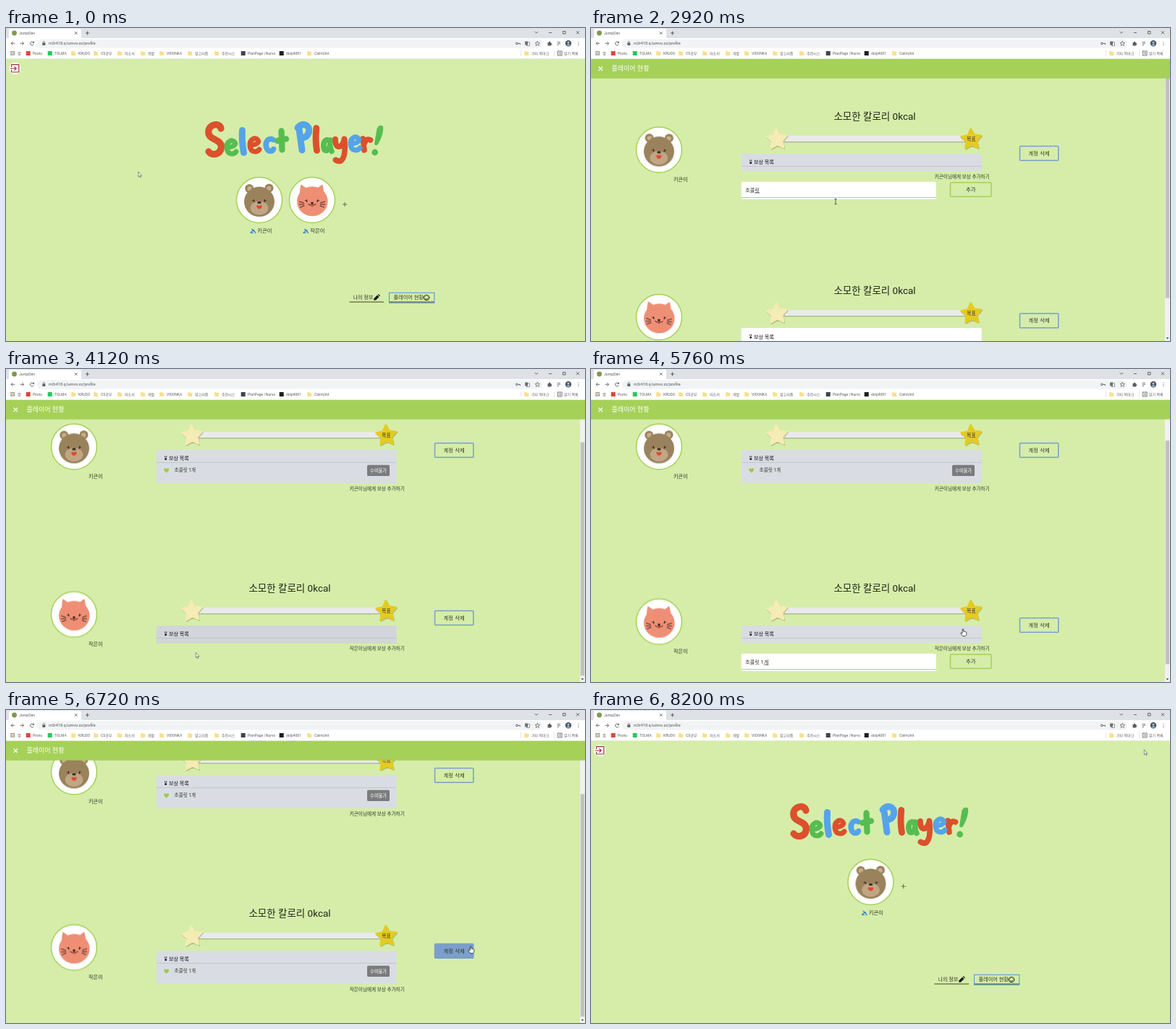
Animation, 800 px wide and 433 px high, one loop 8240 ms. Source, as an HTML page:

```html
<!DOCTYPE html>
<html lang="ko">
<head>
<meta charset="utf-8">
<title>Player select</title>
<style>
html, body { margin: 0; width: 100%; height: 100%; overflow: hidden; background: #d5eda9; }
svg { display: block; width: 100%; height: 100%; }
text { font-family: Roboto, 'Noto Sans CJK KR', 'Noto Sans CJK JP', sans-serif; white-space: pre; }
.head { animation: sway 1648ms ease-in-out infinite; }
@keyframes sway {
  0%, 50%, 100% { transform: rotate(0deg); }
  25% { transform: rotate(-1.5deg); }
  75% { transform: rotate(1.5deg); }
}
</style>
</head>
<body>
<svg id="stage" viewBox="0 0 800 433"></svg>
<script>
const LOOP = 8240, GREEN = '#a5d158', PAGE = '#d5eda9', INK = '#30362a', BLUE = '#7b9fc9';
const RED = '#dc502c', LEAF = '#57bd50', SKY = '#55a4ea';

// ---- markup helpers ----
const rect = (x, y, w, h, fill, more = '') => `<rect x="${x}" y="${y}" width="${w}" height="${h}" fill="${fill}" ${more}/>`;
const dot = (x, y, r, fill, more = '') => `<circle cx="${x}" cy="${y}" r="${r}" fill="${fill}" ${more}/>`;
const oval = (x, y, rx, ry, fill) => `<ellipse cx="${x}" cy="${y}" rx="${rx}" ry="${ry}" fill="${fill}"/>`;
const line = (d, color, w = 1, more = '') => `<path d="${d}" fill="none" stroke="${color}" stroke-width="${w}" ${more}/>`;
const shape = (d, fill, more = '') => `<path d="${d}" fill="${fill}" ${more}/>`;
const label = (x, y, size, str, color = INK, more = '') =>
  `<text x="${x}" y="${y + size * .36}" font-size="${size}" fill="${color}" ${more}>${str}</text>`;
const at = (x, y, inner, more = '') => `<g transform="translate(${x} ${y})" ${more}>${inner}</g>`;
const ROUND = 'stroke-linecap="round" stroke-linejoin="round"';
const MID = 'text-anchor="middle"';

function star(x, y, fill) {
  const pts = [...Array(10)].map((_, i) => {
    const a = i * Math.PI / 5 - Math.PI / 2 - .06, r = i % 2 ? 7.4 : 14.6;
    return (x + r * Math.cos(a)).toFixed(1) + ',' + (y + 1 + r * Math.sin(a)).toFixed(1);
  }).join(' ');
  const poly = (c, more) => `<polygon points="${pts}" fill="${c}" stroke="${c}" stroke-width="2.4" stroke-linejoin="round" ${more}/>`;
  return poly('#8f9468', 'transform="translate(.7 1.2)" opacity=".55"') + poly(fill, '');
}

const heart = (x, y, fill) => at(x, y, shape('M0 3.400C-6 -1 -3 -5 0 -2C3 -5 6 -1 0 3.400Z', fill));

// ---- faces ----
const ring = dot(0, 0, 31.5, '#fff', `stroke="${GREEN}" stroke-width="1.5"`);
const eyes = line('M-9.500 .5L-6.500 1.800M-7.500 -.5V2.200M9.500 .5L6.500 1.800M7.500 -.5V2.200', '#33261b', 1, ROUND);
const bear = ring + `<g class="head">
  ${dot(-13.8, -16, 6, '#99825c')}${dot(13.5, -16.5, 6, '#99825c')}
  ${dot(-13.5, -15.7, 3.2, '#c8ae8b')}${dot(13.2, -16, 3.2, '#c8ae8b')}
  ${oval(0, 2.3, 21, 20.7, '#99825c')}${oval(0, 11, 12.3, 9.6, '#c0a685')}
  ${eyes}${oval(0, 3.4, 2.8, 1.7, '#3b2b22')}
  ${shape('M-4 8Q-2 6.500 0 7.800Q2 6.500 4 8Q3 12 0 12.500Q-3 12 -4 8Z', '#dc4a30')}</g>`;
const cat = ring + `<g class="head">
  ${shape('M-15.500 -21.500Q-11 -19 -5 -14L-17 -6Q-17 -17 -15.500 -21.500ZM14 -21.500Q10 -19 5 -14L16.500 -6Q16 -17 14 -21.500Z', '#ee8f75')}
  ${oval(.3, 1.8, 21.3, 20.5, '#ee8f75')}${eyes}
  ${line('M-17.500 2L-11.500 4M-17.500 6L-11.500 6M-16.500 10L-11 8M17.500 2L11.500 4M17.500 6L11.500 6M16.500 10L11 8', '#3a2620', 1, ROUND)}
  ${line('M-5 5.500Q-2.500 8.500 0 5.500Q2.500 8.500 5 5.500', '#3a2620', 1.1, ROUND)}
  ${oval(0, 4, 2, 1.2, '#3a2620')}${oval(0, 8.2, 1.6, 1.1, '#d9452f')}</g>`;

// ---- select page ----
const smallE = 'M0 8C10 8 13 4 11 1C8 -4 -1 0 0 9C1 18 9 19 13 14';
const letters = [
  [RED, 9.3, 'M297 139C295 130 279.500 133 279.800 144C280 156 298 153 297.500 165C296 176 284 177 280 171'],
  [SKY, 9, 'M326.500 141.500Q325.500 156 328.500 172.500'],
  [SKY, 7.5, 'M369 154.500C361 150.500 357.500 160 360 166C362 171.500 368 171.500 369.500 167.500'],
  [LEAF, 8.3, 'M380.500 142.500L381.500 168.500M375 156L387 153.500'],
  [SKY, 9, 'M405 140L409 169M403 138C410 130 420.500 134 418.500 144C416.500 151 412 152 407 152.500'],
  [RED, 8.8, 'M428.800 138.500Q427 155 429.500 169.500'],
  [LEAF, 7.5, 'M447 156C440 151 437.500 161 439.500 167.500C442 173 449 167 448 155Q447 166 450 170.500'],
  [RED, 7.8, 'M455 154Q455 165 461 164Q466 162 467.500 153.500Q470 178 463 183.500Q459 185 455.500 182.500'],
  [RED, 7.6, 'M493 153L495 169M495 160Q498 151.500 503.500 155']
];
const title = letters.map(([c, w, d]) => line(d, c, w, ROUND)).join('') +
  [[305, 157, LEAF], [337, 154, RED], [476, 152, SKY]].map(([x, y, c]) =>
    at(x, y, line(smallE, c, 6.9, ROUND))).join('') +
  shape('M512.500 139Q516 132.500 521 136Q522.500 146 514 161Q510 164 509 160Z', LEAF) + dot(509.7, 172, 4.4, LEAF);

const player = (id, x, face, name) => at(x, 238,
  face + line('M-12.500 45.500H-8M-10.500 40L-6.500 44M-8.500 42L-12 45M-8 41L-5 46', '#2f7cd0', 1.2) + label(-2.7, 42, 7.3, name), `id="${id}"`);

const select = `
  ${dot(12.3, 56, 8.3, '#fff')}
  ${line('M7.500 54V51Q7.500 50.700 8 50.700H17Q17.800 50.700 17.800 51.500V60.300Q17.800 61 17 61H8Q7.500 61 7.500 60.500V58M6 56H14M11.500 53.300L14.200 56L11.500 58.700', '#9c2f35', 1.2)}
  ${title}
  ${player('p1', 350, bear, '키큰이')}${player('p2', 423, cat, '작은이')}
  <g id="plus">${line('M465 244H471.200M468.100 240.900V247.100', '#4b5240', .8)}</g>
  ${label(479.500, 372.5, 7.1, '나의 정보')}
  ${line('M474.500 379H522', '#3d4420', 1.1)}
  ${shape('M508 376.500L508.500 374L513 369.500L515.500 372L511 376.500ZM513.700 368.800L514.600 368L517 370.300L516 371.300Z', '#171a10')}
  ${rect(529.5, 366.3, 62.3, 14, 'none', 'stroke="#569be0" stroke-width="1.1"')}
  ${line('M530 379H591.500', '#3d4420', 1.1)}
  ${label(535.500, 372.5, 7.2, '플레이어 현황')}
  ${dot(581, 373, 3.7, 'none', 'stroke="#171a10" stroke-width=".9"')}
  ${line('M576.300 373H577.500M584.500 373H585.700M579 374.300Q581 376.300 583 374.300M579.300 371.800H580M582 371.800H582.700', '#171a10', .8)}`;

// ---- status dialog ----
const section = (face, name) => `
  ${label(392, 122, 13.5, '소모한 칼로리 0kcal', '#20261a', MID)}
  ${rect(262, 150, 260, 8.4, '#8f9a78', 'opacity=".6"')}${rect(262, 149, 260, 8, '#e9eaea')}
  ${star(257, 153, '#f5ebb4')}${star(525.5, 153, '#e5cb20')}
  ${label(525.5, 153, 7, '목표', INK, MID)}
  <g class="side">
    ${at(94, 159, face)}${label(114, 200, 7.2, name)}
    ${rect(592.5, 154, 53.3, 19.7, 'none', `class="del" rx="1" stroke="${BLUE}" stroke-width="1.5"`)}
    ${label(619.2, 163.8, 7.2, '계정 삭제', INK, MID + ' letter-spacing=".25"')}
  </g>
  ${rect(207.7, 174, 332, 25.5, '#fff', 'class="acc" rx="1.5"')}
  ${rect(207.7, 174, 332, 25, '#888', 'class="ripple" rx="1.5"')}
  <g class="caption">${line('M219.700 182.700V185M221.700 182.700V185', '#222', .9)}${dot(220.7, 187, 1.5, '#222')}
    ${label(225, 186, 7.1, '보상 목록', '#111', 'font-weight="500"')}</g>
  ${line('M208 191.300H539.500', '#bcc1c6', .8, 'class="rule"')}
  <g class="item">${heart(221.7, 202.3, '#9ccb45')}${label(232.5, 202, 6.6, '초콜릿 1개')}
    ${rect(499, 194.7, 31, 15.2, '#7a7b7c', 'rx="1.5"')}${label(514.5, 202.3, 6.3, '수여불가', '#fff', MID)}</g>
  <g class="below">${label(474.7, 207, 6.6, name + '님에게 보상 추가하기')}
    <g class="form">${rect(207.7, 214.3, 269, 24, '#fff', 'rx="1.5"')}
      ${line('M208 236H476.700', GREEN, .9)}
      ${label(213, 225.6, 7.2, '')}
      ${rect(496.5, 215.3, 56.5, 19.5, 'none', `rx="1" stroke="${GREEN}" stroke-width="1.5"`)}
      ${label(524.8, 225, 7.4, '추가', INK, MID)}</g></g>`;

const dialog = `
  ${rect(0, 43, 800, 390, PAGE)}
  <g id="s1">${section(bear, '키큰이')}</g><g id="s2">${section(cat, '작은이')}</g>
  <g id="bar">${rect(793, 43, 7, 390, '#f1f1f1')}${rect(793.8, 50, 5.4, 300, '#c1c1c1', 'id="thumb"')}
    ${shape('M794.700 428L798.300 428L796.500 430.500Z', '#555')}</g>
  ${rect(0, 69, 800, 1, '#8fb352', 'opacity=".35"')}${rect(0, 42.5, 800, 27, GREEN)}
  ${line('M10.500 53.500L16 59M16 53.500L10.500 59', '#fff', 1.1)}
  ${label(28.5, 56, 9, '플레이어 현황', '#fff')}`;

// ---- browser frame ----
const folder = x => shape(`M${x - 3} 32H${x - .5}L${x + .3} 33H${x + 3}V38H${x - 3}Z`, '#f9df8c');
const mark = (x, c) => rect(x - 3, 32, 6, 6, c);
const links = [
  [16, '앱'], [37, 'Postu', '#d9483b'], [67, 'TOLMA', '#27c75a'], [100, 'KRUDO'], [131, 'CS공부'], [164, '자소서'],
  [196, '개발'], [222, 'VIDONKA'], [261, '알고리즘'], [298, '추천시스'], [334, 'PlanPage | Nurvo', '#3c4450'],
  [387, 'dolp4081', '#1d1f22'], [426, 'CalmUnit'], [726, '기타 북마크'], [771, '읽기 목록', '']
];
const apps = [...Array(9)].map((_, i) =>
  rect(6.3 + i % 3 * 2.1, 32 + (i / 3 | 0) * 2.1, 1.5, 1.5, ['#e2574c', '#f0b93a', '#3f9b57', '#4a83dd'][(i * 2 + (i / 3 | 0)) % 4])).join('');
const GREY = '#5b5f64';
const frame = `
  ${rect(0, 0, 800, 14.5, '#dee1e6')}${rect(0, 14, 800, 28.6, '#fff')}
  ${shape('M2 14.500Q4 14 4 12V3Q4 1 6 1H102Q104 1 104 3V12Q104 14 106 14.500Z', '#fff')}
  ${dot(11.5, 7, 3.4, '#7c9a4c')}${label(18, 7, 5.2, 'JumpDen', '#5a5d61')}
  ${line('M95 5.300L98.400 8.700M98.400 5.300L95 8.700M110 7H115M112.500 4.500V9.500', '#3c4043', .8)}
  ${line('M730.500 5L732.800 7.200L735 5M750 6.500H754M769.500 4.500H773V8H769.500ZM788 4.300L792 8.300M792 4.300L788 8.300', '#333', .7)}
  ${rect(43, 15.6, 698, 11.8, '#f1f3f4', 'rx="5.9"')}
  ${line('M12 21.300H7M9.300 19L7 21.300L9.300 23.600M19.500 21.300H24.500M22.200 19L24.500 21.300L22.200 23.600', GREY, .9)}
  ${line('M38 20A2.500 2.500 0 1 0 38.300 22.500M38.500 18.500V20.500H36.500', GREY, .9)}
  ${rect(50.3, 20.6, 4, 3.3, GREY)}${line('M51.200 21V19.600A1.100 1.100 0 0 1 53.400 19.600V21', GREY, .7)}
  ${label(59, 21.4, 5.5, 'm3r418.q.lumvo.zz/profile', '#505458')}
  ${dot(705.8, 21.4, 1.3, 'none', `stroke="${GREY}"`)}${line('M707.300 21.400H710.300V23', GREY, 1)}
  ${rect(717, 18.5, 4, 5, '#74787d')}${rect(719.5, 19.8, 4, 4.8, 'none', `stroke="${GREY}" stroke-width=".6"`)}
  ${line('M734.300 18L735.200 20.400L737.600 20.500L735.700 22L736.400 24.500L734.300 23L732.200 24.500L732.900 22L731 20.500L733.400 20.400Z', GREY, .7)}
  ${shape('M748.500 20H750V18.700H752V20H753.300V21.500H754.300V23H753.300V24.500H748.500Z', GREY)}
  ${line('M761.500 19.500H766M761.500 21.500H766M761.500 23.500H764', GREY, .8)}
  ${dot(777, 21.3, 4.2, '#45586b')}${dot(777, 20.2, 1.4, '#b9c6cf')}${shape('M774.300 24.200Q777 20.500 779.700 24.200Z', '#b9c6cf')}
  ${[19, 21.3, 23.6].map(y => dot(791, y, .6, GREY)).join('')}
  ${apps}
  ${links.map(([x, s, c], i) => (i && c !== '' ? (c ? mark(x - 6.3, c) : folder(x - 6.8)) : '') + label(x, 34.8, 5, s, '#5a5d61')).join('')}
  ${rect(762.5, 32, 5.6, 6, 'none', `stroke="${GREY}" stroke-width=".8"`)}${line('M764 34H767M764 36H767', GREY, .8)}
  ${line('M711.500 31V39M757.500 31V39', '#d3d6da', .6)}
  ${rect(0, 42, 800, .6, '#dfe6d2')}`;

const pointers = `
  <g id="arrow">${shape('M.3 .3V7.300L1.900 5.900L2.900 8.300L4 7.800L3 5.500H5Z', '#fff', 'stroke="#444" stroke-width=".6"')}</g>
  <g id="hand">${shape('M-.800 6V1Q0 -.300 .800 1V4Q4.800 4 5 6Q5 9.500 3.300 10.500H-.500Q-2 8.500 -3.300 6.500Q-2.300 5 -.800 6.700Z', '#fff', 'stroke="#222" stroke-width=".8"')}</g>
  <g id="beam">${line('M-1.500 -3.500H1.500M0 -3.500V3.500M-1.500 3.500H1.500', '#333', .8)}</g>`;

const stage = document.getElementById('stage');
stage.innerHTML = `${rect(0, 0, 800, 433, PAGE)}${select}<g id="dialog">${dialog}</g>${frame}<g id="pointer">${pointers}</g>`;

// ---- motion ----
const $ = id => document.getElementById(id);
const show = (el, on) => el.style.display = on ? '' : 'none';
const move = (el, x, y) => el.setAttribute('transform', `translate(${x} ${y})`);
const ramp = (t, a, b) => {
  const p = Math.min(1, Math.max(0, (t - a) / (b - a)));
  return p * p * (3 - 2 * p);
};

const strokes = ['', 'ㅊ', '초', '초코', '초콜', '초콜리', '초콜릿', '초콜릿 ', '초콜릿 1', '초콜릿 1ㄱ', '초콜릿 1개'];
function typed(t, start, pace) {
  const s = strokes[Math.max(0, Math.min(strokes.length - 1, Math.floor((t - start) / pace)))];
  return /[ㄱ-힣]$/.test(s) ? s.slice(0, -1) + `<tspan text-decoration="underline">${s.slice(-1)}</tspan>` : s;
}

// time, x, y and pointer kind from that time on
const track = [
  [0, 182.5, 198.5, 'arrow'], [80, 182.5, 198.5, 'arrow'], [700, 560, 372, 'hand'], [880, 560, 372, 'arrow'],
  [1420, 332, 191, 'hand'], [1660, 332, 191, 'hand'], [2040, 513, 206, 'hand'], [2140, 513, 206, 'arrow'],
  [2460, 338, 226, 'beam'], [2800, 338, 240, 'beam'], [3140, 338, 240, 'arrow'], [3440, 524, 221, 'hand'],
  [3580, 524, 221, 'arrow'], [3940, 262, 365, 'hand'], [4040, 262, 368, 'hand'], [4110, 262, 392, 'arrow'],
  [4240, 262, 392, 'arrow'], [4640, 513, 385, 'hand'], [4800, 513, 385, 'arrow'], [5000, 420, 404, 'beam'],
  [5500, 420, 404, 'beam'], [5700, 514, 359, 'hand'], [5800, 514, 359, 'hand'], [5980, 524, 401, 'hand'],
  [6160, 524, 401, 'arrow'], [6640, 642, 326, 'hand'], [6880, 642, 326, 'arrow'], [7140, 13, 55, 'hand'],
  [7260, 13, 55, 'arrow'], [7580, 400, 120, 'arrow'], [8040, 764, 54.5, 'arrow']
];
function drawPointer(t) {
  const i = track.findLastIndex(k => k[0] <= t);
  const a = track[i], b = track[i + 1] || a;
  const p = ramp(t, a[0], b[0] + (a === b));
  move($('pointer'), a[1] + (b[1] - a[1]) * p, a[2] + (b[2] - a[2]) * p);
  for (const kind of ['arrow', 'hand', 'beam']) show($(kind), kind === a[3]);
}

const plans = [
  { root: $('s1'), press: 1440, open: 1580, form: 2100, type: 2600, pace: 50, add: 3520 },
  { root: $('s2'), press: 3970, open: 4000, form: 4720, type: 5100, pace: 55, add: 6060 }
];
// Lays one section out and returns how much taller than collapsed it is.
function drawSection(t, plan) {
  const q = c => plan.root.querySelector('.' + c);
  const open = ramp(t, plan.open, plan.open + 90);
  const form = t >= plan.form && t < plan.add, item = t >= plan.add;
  const grow = -1.5 * open + (item ? 22 : 0);
  const extra = -open + (form ? 20 : 0) + (item ? 22 : 0);
  const shade = (a, b) => Math.round(a + (b - a) * open);
  q('acc').setAttribute('height', 25.5 + grow);
  q('acc').setAttribute('fill', `rgb(${shade(255, 217)},${shade(255, 221)},${shade(255, 227)})`);
  q('ripple').setAttribute('opacity', .13 * ramp(t, plan.press, plan.press + 40) * (1 - ramp(t, plan.open + 60, plan.open + 240)));
  q('rule').setAttribute('opacity', open);
  move(q('caption'), 0, -.5 * open);
  move(q('below'), 0, grow);
  move(q('side'), 0, extra / 2);
  show(q('item'), item);
  show(q('form'), form);
  q('form').querySelector('text').innerHTML = typed(t, plan.type, plan.pace);
  return extra;
}

function render(t) {
  const deleted = t >= 6860;
  const [e1, e2] = plans.map(p => drawSection(t, p));
  const scroll = deleted ? 0 : 62 * ramp(t, 3660, 3840) + 22 * ramp(t, 6240, 6420);
  const full = 433 + e1 + e2;
  move($('s1'), 0, -scroll);
  move($('s2'), 0, 222 + e1 - scroll);
  show($('s2'), !deleted);
  show($('bar'), !deleted);
  $('thumb').setAttribute('y', 50 + 375 * scroll / full);
  $('thumb').setAttribute('height', 375 * 390 / full);
  $('s2').querySelector('.del').setAttribute('fill', t >= 6600 && !deleted ? BLUE : 'none');

  const up = ramp(t, 860, 980) - ramp(t, 7240, 7360);
  show($('dialog'), up > 0);
  move($('dialog'), 0, 391 * (1 - up));

  move($('p1'), deleted ? 386.5 : 350, 238);
  show($('p2'), !deleted);
  move($('plus'), deleted ? -36.5 : 0, 0);
  drawPointer(t);
}

const begin = performance.now();
function tick() {
  render((performance.now() - begin) % LOOP);
  requestAnimationFrame(tick);
}
tick();
</script>
</body>
</html>
```
